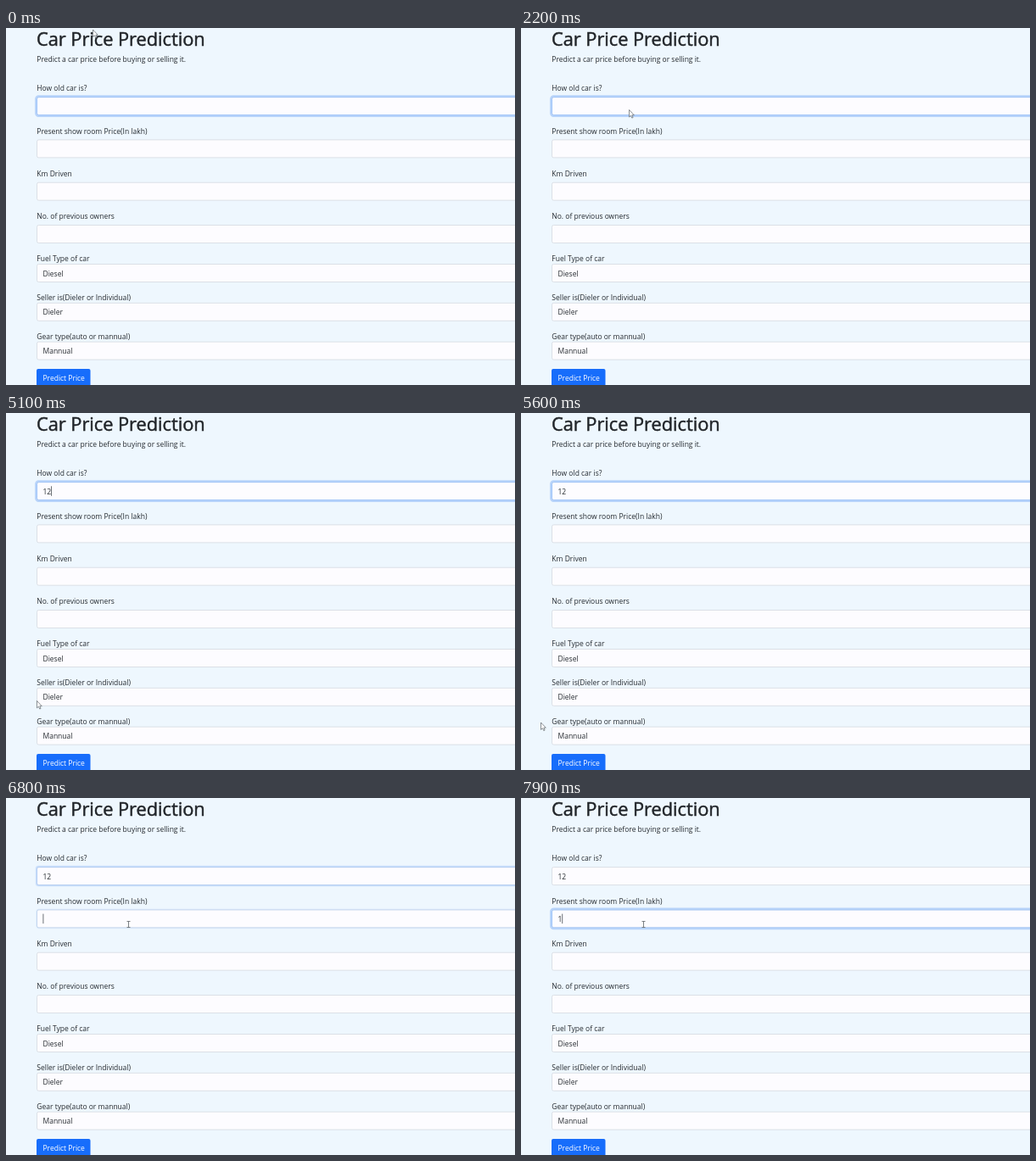
An HTML page for the animation above (8000 ms loop, 600 by 421 pixels).

```html
<!DOCTYPE html>
<html lang="en">
<head>
<meta charset="utf-8">
<title>Car Price Prediction</title>
<style>
  html, body { margin: 0; width: 100%; height: 100%; overflow: hidden; background: #eef7fe; }
  svg { display: block; width: 600px; height: 421px; }
  text { font: 8.5px "Open Sans", "Noto Sans", sans-serif; fill: #262b30; white-space: pre; }
  .title { font-size: 21.75px; fill: #212529; stroke: #212529; stroke-width: .5px; }
  .box { fill: #fdfcff; stroke: #dbe0e6; }
  .ring { fill: none; stroke: #b7d3fa; }
  .edge { fill: none; stroke: #a0c5f9; }
  .button { fill: #176dfb; }
  .light { fill: #fff; }
</style>
</head>
<body>
<svg id="stage" viewBox="0 0 600 421"></svg>
<script>
const stage = document.getElementById('stage');

function add(tag, attrs, content = '') {
  const el = document.createElementNS('http://www.w3.org/2000/svg', tag);
  set(el, attrs);
  el.textContent = content;
  return stage.appendChild(el);
}
function set(el, attrs) {
  for (const name in attrs) el.setAttribute(name, attrs[name]);
}
const label = (x, y, content, cls = '') => add('text', { x, y, class: cls }, content);
const box = (y, cls) => add('rect', { x: 36.5, y, width: 620, height: 21, rx: 2, class: cls });

label(36, 21, 'Car Price Prediction', 'title');
label(36.3, 40.3, 'Predict a car price before buying or selling it.');

const inputs = ['How old car is?', 'Present show room Price(In lakh)', 'Km Driven', 'No. of previous owners'];
const fields = inputs.map((name, i) => {
  const top = 81.6 + 50.3 * i;
  label(36.3, 74.3 + 50.2 * i, name);
  box(top, 'box');
  return { top, value: label(43.5, top + 14, ''), ring: box(top, 'ring'), edge: box(top, 'edge') };
});

const selects = [
  ['Fuel Type of car', 'Diesel'],
  ['Seller is(Dieler or Individual)', 'Dieler'],
  ['Gear type(auto or mannual)', 'Mannual']
];
selects.forEach(([name, choice], i) => {
  const top = 278.5 + 45.8 * i;
  label(36.3, top - 3.4, name);
  box(top, 'box');
  label(43.5, top + 14, choice);
});

add('rect', { x: 36, y: 402, width: 63.5, height: 22, rx: 2, class: 'button' });
label(43.5, 416, 'Predict Price', 'light');

const caret = add('rect', { width: 1, height: 11.5, fill: '#6c7177' });
const arrow = add('path', {
  d: 'M0 0V8.4L2 6.7L3.3 9.6L4.6 9L3.4 6.2H5.8Z',
  fill: '#fff', stroke: '#50555c', 'stroke-width': .65, 'stroke-linejoin': 'round'
});
const beam = add('path', {
  d: 'M-2 -3.5H2M0 -3.5V3.5M-2 3.5H2', fill: 'none', stroke: '#666b71', 'stroke-width': .85
});

// Each move bends towards a control point on its way to the next resting place.
const home = [102.5, 2];
const moves = [
  { from: 1100, to: 2100, bend: [158.7, 70.5], end: [127.5, 96.5] },
  { from: 2500, to: 2600, bend: [95, 210], end: [63.5, 323] },
  { from: 5000, to: 5600, bend: [-30, 378], end: [23.5, 365] },
  { from: 5600, to: 6600, bend: [205, 160], end: [144.5, 149] }
];

// Every action restarts the caret's blinking.
const actions = [
  { at: 400, field: 0, text: '' },
  { at: 4400, field: 0, text: '1' },
  { at: 4650, field: 0, text: '12' },
  { at: 6740, field: 1, text: '' },
  { at: 7850, field: 1, text: '1' }
];
const blink = 530;
const refocus = 6740;

const clamp = v => Math.min(1, Math.max(0, v));
const smooth = v => v * v * (3 - 2 * v);

function pointer(t) {
  return moves.reduce((start, { from, to, bend, end }) => {
    const u = clamp((t - from) / (to - from));
    return start.map((s, i) => (1 - u) ** 2 * s + 2 * u * (1 - u) * bend[i] + u * u * end[i]);
  }, home);
}

function glow({ top, ring, edge }, k) {
  const grow = .5 + .9 * k;
  set(ring, {
    x: 36.5 - grow, y: top - grow, height: 21 + 2 * grow, rx: 2 + grow,
    'stroke-width': 2 * k, opacity: k
  });
  set(edge, { opacity: k });
}

function draw(t) {
  const past = actions.filter(action => action.at <= t);
  fields.forEach((field, i) => {
    const last = past.filter(action => action.field === i).pop();
    field.value.textContent = last ? last.text : '';
  });

  const shift = smooth(clamp((t - refocus) / 150));
  fields.forEach((field, i) => glow(field, [1 - shift, shift][i] || 0));

  const { at, field, text } = past.pop() || { ...actions[0], at: blink };
  const lit = Math.floor((t - at) / blink) % 2 === 0;
  set(caret, {
    x: 43.4 + text.length * 4.8, y: fields[field].top + 4.7,
    opacity: lit && t >= actions[0].at ? 1 : 0
  });

  const [x, y] = pointer(t);
  const depth = y - fields[1].top;
  const inside = depth > 0 && depth < 21;
  set(arrow, { transform: `translate(${x} ${y})`, opacity: inside ? 0 : 1 });
  set(beam, { transform: `translate(${x} ${y})`, opacity: inside ? 1 : 0 });
}

const start = performance.now();
function tick() {
  const t = (performance.now() - start) % 8000;
  draw(Math.floor(t / 100) * 100);
  requestAnimationFrame(tick);
}
tick();
</script>
</body>
</html>
```
